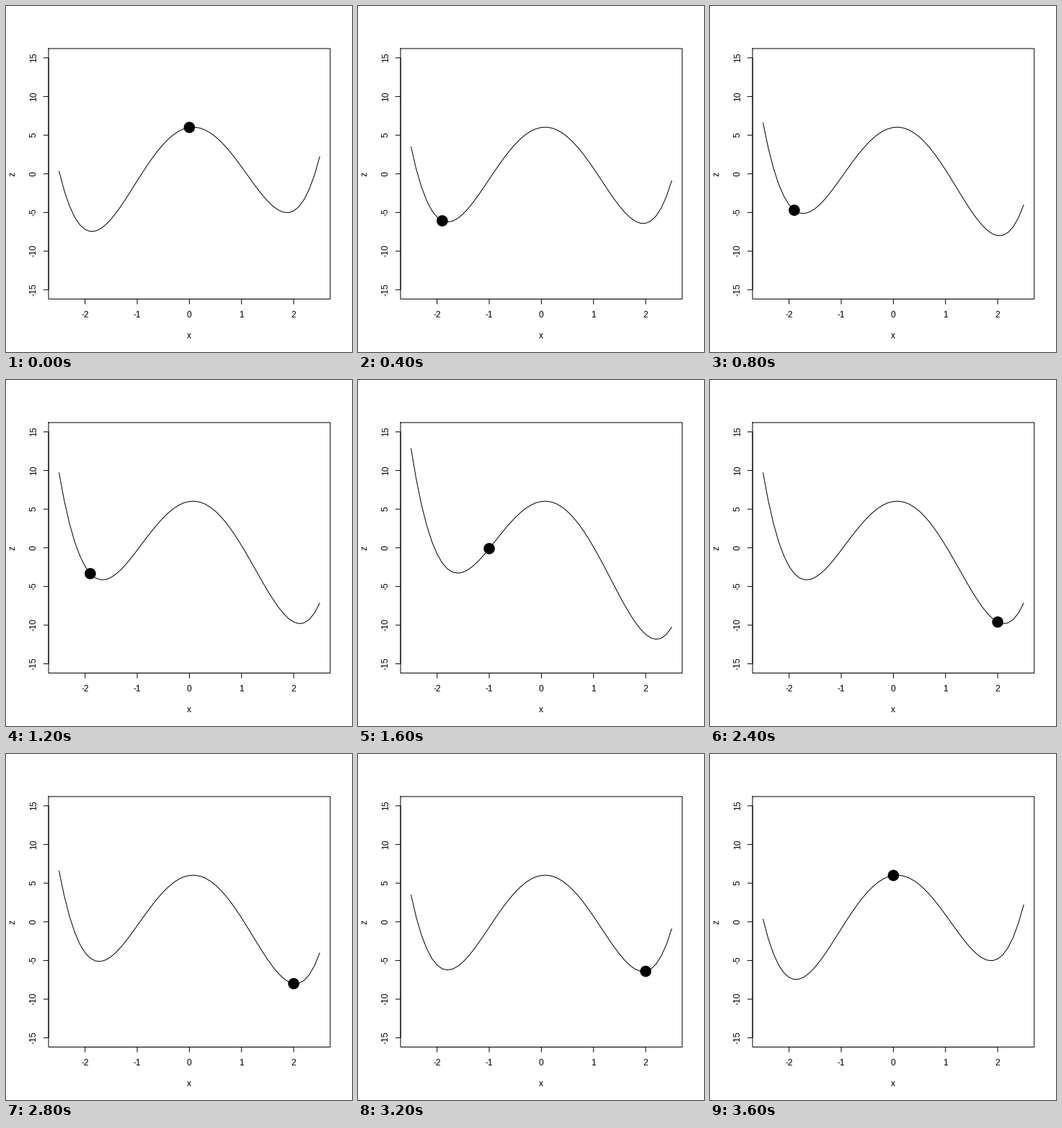
Write a matplotlib script that moves like this. It is 480x480 px and loops after 3800 ms.

```python
import numpy as np
import matplotlib.pyplot as plt
from matplotlib.animation import FuncAnimation
from matplotlib.patches import Circle

SIZE, DPI = 480, 80
PT = 72 / DPI                       # points per pixel
LINE = 14.4                         # height of one margin line
LEFT, RIGHT = 59.04, 449.76
TOP, BOTTOM = 59.04, 406.56
FRAMES, INTERVAL = 19, 200
WELL_L, WELL_R = -1.9, 2
RADIUS = 7.8

plt.rcParams["font.family"] = "Liberation Sans"
fig = plt.figure(figsize=(SIZE / DPI, SIZE / DPI), dpi=DPI, facecolor="white")
ax = fig.add_axes([0, 0, 1, 1])
ax.set_xlim(0, SIZE)
ax.set_ylim(SIZE, 0)
ax.axis("off")


def px(x):
    return (LEFT + RIGHT) / 2 + x * (RIGHT - LEFT) / 5.4


def py(z):
    return (TOP + BOTTOM) / 2 - z * (BOTTOM - TOP) / 32.4


def stroke(xs, ys, cap="butt", join="miter"):
    return ax.plot(xs, ys, color="black", lw=PT, snap=False,
                   solid_capstyle=cap, solid_joinstyle=join)[0]


def label(x, y, text, angle=0):
    ax.text(x, y, text, size=12 * PT, color="black", rotation=angle,
            rotation_mode="anchor", ha="center", va="baseline")


def potential(x, c):
    return x**4 - c * x**3 - 7 * x**2 + x + 6


def tilt(i):
    """Cubic weight: rises from 0.1 to 1.0 and falls back."""
    return 0.1 * (10 - abs(9 - i))


def ball_x(i):
    """Left well in the first half, right well in the second."""
    if i < 9:
        return max(WELL_L, -min(i, 9 - i))
    return min(WELL_R, i - 9, 18 - i)


# box and axes
stroke([LEFT, RIGHT, RIGHT, LEFT, LEFT], [TOP, TOP, BOTTOM, BOTTOM, TOP],
       "projecting")
stroke([px(-2), px(2)], [BOTTOM, BOTTOM])
stroke([LEFT, LEFT], [py(-15), py(15)])
for v in range(-2, 3):
    x = px(v)
    stroke([x, x], [BOTTOM, BOTTOM + LINE / 2])
    label(x - 0.3, BOTTOM + 1.8 * LINE, str(v))
for v in range(-15, 16, 5):
    y = py(v)
    stroke([LEFT, LEFT - LINE / 2], [y, y])
    label(LEFT - 1.2 * LINE, y - 0.3, str(v), 90)
label(px(0) - 0.3, BOTTOM + 3.8 * LINE, "x")
label(LEFT - 3.2 * LINE, py(0) - 0.3, "z", 90)

grid = np.linspace(-2.5, 2.5, 51)
curve = stroke(px(grid), py(potential(grid, tilt(0))), join="round")
ball = Circle((px(0), py(6)), RADIUS, facecolor="black", edgecolor="none",
              lw=0, zorder=5)
ax.add_patch(ball)


def update(i):
    c, x = tilt(i), ball_x(i)
    curve.set_ydata(py(potential(grid, c)))
    ball.center = px(x), py(potential(x, c))
    return curve, ball


anim = FuncAnimation(fig, update, frames=FRAMES, interval=INTERVAL,
                     init_func=lambda: update(0), repeat=True, repeat_delay=0)
plt.show()
```
